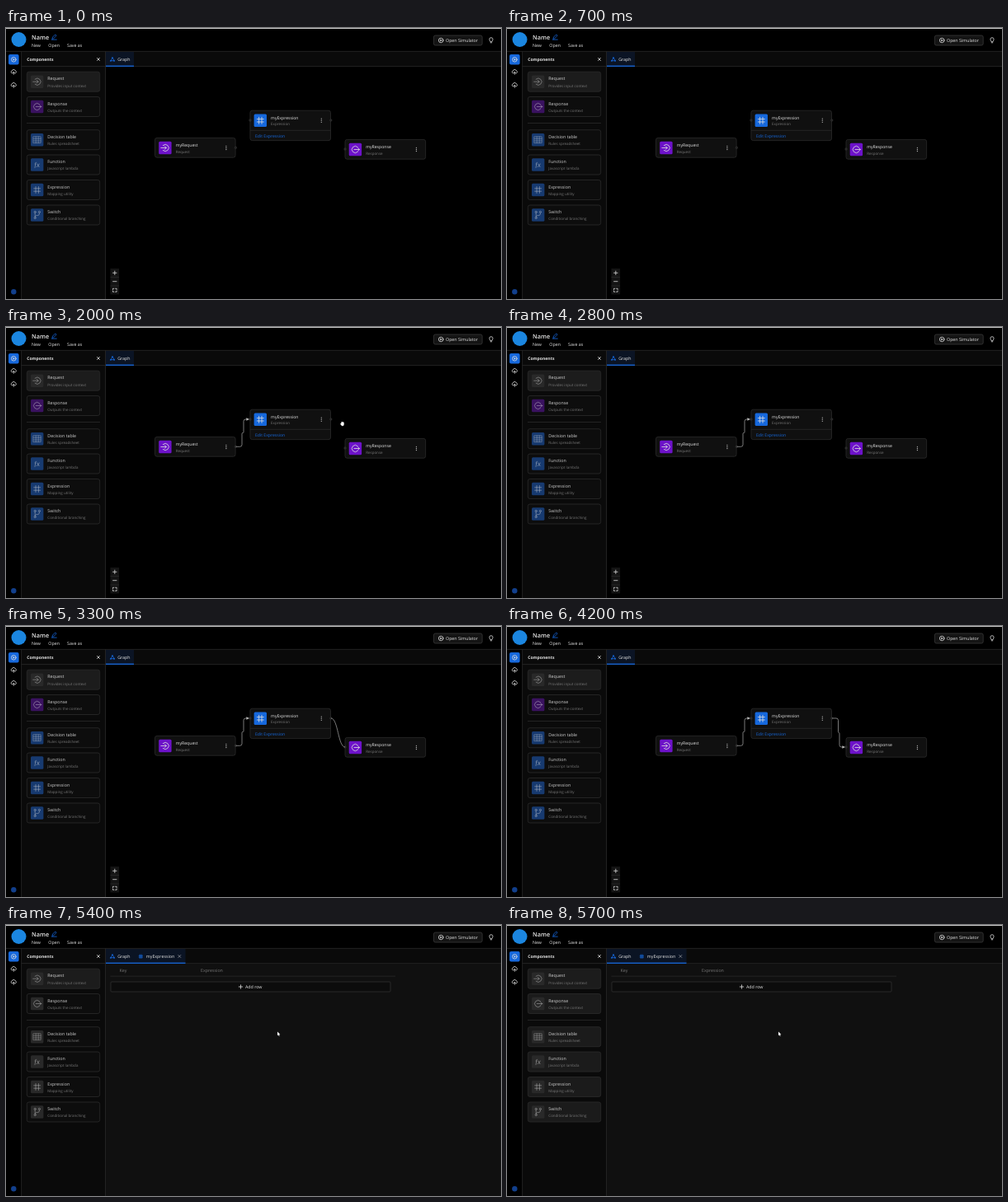
An HTML page that plays this animation: 600x329 px, repeating every 5.8 s.

```html
<!DOCTYPE html>
<html lang="en">
<head>
<meta charset="utf-8">
<title>Graph editor</title>
<style>
html, body { margin: 0; width: 100%; height: 100%; overflow: hidden; background: #000; }
svg { display: block; width: 600px; height: 329px; }
text { font: 5.3px "Open Sans", "Noto Sans", sans-serif; fill: #e4e4e4; text-rendering: geometricPrecision; }
text.sub { font-size: 4.5px; fill: #777; }
.line { fill: none; stroke: #ddd; stroke-width: .8; stroke-linecap: round; stroke-linejoin: round; }
.rule { fill: none; stroke: #2a2a2a; stroke-width: .8; }
.edge { fill: none; stroke: #999; stroke-width: .8; }
</style>
</head>
<body>
<svg id="stage" viewBox="0 0 600 329"></svg>
<script>
const LOOP = 5800, BLUE = '#1668dc', PURPLE = '#6d12c9';
const OPEN_EDITOR = 5400;

const rect = (x, y, w, h, fill, more = '') => `<rect x="${x}" y="${y}" width="${w}" height="${h}" fill="${fill}" ${more}/>`;
const text = (x, y, s, more = '') => `<text x="${x}" y="${y}" ${more}>${s}</text>`;
const line = (d, more = '') => `<path class="line" d="${d}" ${more}/>`;
const rule = d => `<path class="rule" d="${d}"/>`;
const at = (x, y, s, more = '') => `<g transform="translate(${x} ${y})" ${more}>${s}</g>`;
const group = (id, s) => `<g id="${id}">${s}</g>`;

const BORDER = 'stroke="#2b2b2b" stroke-width=".8" rx="2.5"';
const HASH = 'M-1.7-4V4M1.7-4V4M-4-1.7H4M-4 1.7H4';

// Glyphs are centred on the origin.
const glyphs = {
  request: line('M-2.6-3A4.1 4.1 0 1 1-2.6 3M-5 0H1.4M-.5-1.9 1.4 0-.5 1.9'),
  response: line('M2.8-3A4.1 4.1 0 1 0 2.8 3M-1.4 0H5M3.1-1.9 5 0 3.1 1.9'),
  table: line('M-4.5-3.8H4.5V3.8H-4.5ZM-4.5-1.3H4.5M-4.5 1.3H4.5M-1.5-3.8V3.8M1.5-3.8V3.8', 'style="stroke-width:.6"'),
  fx: text(0, 2.6, 'fx', 'text-anchor="middle" style="font:italic 8.5px Lato,sans-serif"'),
  hash: line(HASH),
  branch: line('M-2.5-2.6V2.6M2.7-2.6V-1.5Q2.7 .6 .5 .6H-.5Q-2.5 .6-2.5 2.6') +
    [[-2.5, -3.6], [2.7, -3.6], [-2.5, 3.6]].map(([x, y]) => `<circle class="line" cx="${x}" cy="${y}" r="1.1"/>`).join('')
};
const play = '<circle class="line" r="2.8"/><path d="M-.8-1.4 1.5 0-.8 1.4Z" fill="#ddd"/>';
const cloud = line('M-1.5 1.3H-2A1.5 1.5 0 0 1-2-1.6 2.1 2.1 0 0 1 2-1.6 1.5 1.5 0 0 1 2 1.3H1.5M0 2.8V0M-1 1 0 0 1 1');
const closeMark = line('M-1.5-1.5 1.5 1.5M1.5-1.5-1.5 1.5');

const cards = [
  [65.2, 'Request', 'Provides input context', 'request', '#292929'],
  [95.5, 'Response', 'Outputs the context', 'response', '#3a1260'],
  [135.7, 'Decision table', 'Rules spreadsheet', 'table', '#173a70'],
  [166, 'Function', 'Javascript lambda', 'fx', '#173a70'],
  [196.5, 'Expression', 'Mapping utility', 'hash', '#173a70'],
  [227, 'Switch', 'Conditional branching', 'branch', '#173a70']
];
const card = ([y, name, note, glyph]) =>
  rect(25.3, y - 12, 88.4, 24, '#0d0d0d', `class="card" ${BORDER}`) +
  rect(30, y - 7.7, 15.4, 15.4, '#292929', 'class="badge" rx="1.5"') +
  at(37.7, y, glyphs[glyph], 'opacity=".5"') +
  text(50.3, y - 1.8, name, 'fill-opacity=".9"') + text(50.3, y + 6.3, note, 'class="sub"');

const node = (x, y, h, name, kind, glyph, color) =>
  rect(x, y, 97.6, h, '#101010', BORDER) +
  rect(x + 4.7, y + 4.4, 15.4, 15.4, color, 'rx="1.5"') + at(x + 12.4, y + 12.1, glyphs[glyph]) +
  text(x + 25.2, y + 10.3, name, 'style="font-size:5.15px"') + text(x + 25.2, y + 18.2, kind, 'class="sub"') +
  [-2.1, 0, 2.1].map(d => `<circle cx="${x + 86.4}" cy="${y + 12 + d}" r=".65" fill="#bbb"/>`).join('');
const port = (x, y) => `<circle cx="${x}" cy="${y}" r="1.2" fill="#1b1b1b" stroke="#444" stroke-width=".5"/>`;
const joined = (id, d, x, y) => group(id, `<path class="edge" d="${d}"/><path d="M${x} ${y}l-3.6-1.8v3.6z" fill="#bbb"/>`);

const header =
  rect(0, 0, 600, 1, '#c8c8c8') + rule('M0 28.4H600M18.6 28.4V329M120.5 28.4V329M18.6 46.6H600') +
  '<circle cx="15.5" cy="14" r="9" fill="#1b86e0"/>' +
  text(31, 13.6, 'Name', 'style="font-size:7.3px;font-weight:600"') +
  at(58.3, 10.8, line('M-2.3 2.2-1.8.3 1.4-2.9 2.8-1.5-.4 1.7ZM-3 3.3H3', `style="stroke:${BLUE}"`)) +
  text(31, 22.5, 'New') + text(51.3, 22.5, 'Open') + text(74, 22.5, 'Save as') +
  rect(518.4, 9, 58.8, 12, '#141414', 'stroke="#383838" stroke-width=".8" rx="2"') + at(527.2, 15, play) +
  text(533, 16.9, 'Open Simulator') +
  at(588, 15, line('M-1 1.3C-1 .6-2.1 0-2.1-1.2A2.1 2.1 0 0 1 2.1-1.2C2.1 0 1 .6 1 1.3ZM-.8 2.8H.8')) +
  rect(3, 32, 12.6, 12.6, BLUE, 'rx="2"') + at(9.3, 38.3, play) + at(9.3, 53.5, cloud) + at(9.3, 69.5, cloud) +
  '<circle cx="9.3" cy="320.3" r="3.2" fill="#123f8c"/>';

const panel = text(25.2, 39.8, 'Components', 'style="font-size:5.1px;font-weight:700"') +
  at(112, 38, closeMark) + cards.map(card).join('') + rule('M25 115.5H114');

const tabs = rect(121, 29, 34, 17.2, '#0b1424') +
  at(129, 38.2, line('M0-1.8-1.9 1.5H1.9Z', `style="stroke:${BLUE}"`) +
    [[0, -2], [-2.1, 1.6], [2.1, 1.6]].map(([x, y]) => `<circle cx="${x}" cy="${y}" r=".9" fill="${BLUE}"/>`).join('')) +
  text(135.2, 40, 'Graph') + rect(121, 45.6, 34, 1.3, BLUE);

const graph = rect(121, 47, 479, 282, '#000') +
  node(180.5, 133.4, 23.8, 'myRequest', 'Request', 'request', PURPLE) +
  node(295.9, 100.2, 36.4, 'myExpression', 'Expression', 'hash', BLUE) +
  rule('M296 124.3H393.5') + text(302, 133, 'Edit Expression', 'id="edit" style="font-size:5.1px"') +
  node(411, 135.4, 23.8, 'myResponse', 'Response', 'response', PURPLE) +
  port(278.4, 145.3) + port(295.9, 112) + port(393.8, 112) + port(411, 147) +
  '<path id="drag" class="edge"/>' +
  joined('edge1', 'M278.5 145.3H283.5Q286 145.3 286 142.8V129.5Q286 128.5 287 128.5T288 127.5V114.5Q288 112 290.5 112H293', 295, 112) +
  joined('edge2', 'M394 112H399Q401.5 112 401.5 114.5V128.5Q401.5 129.5 402.2 129.5T403 130.5V144.5Q403 147 405.5 147H408', 410, 147) +
  rect(126.5, 292, 10.6, 31.4, '#141414') + rule('M126.5 302.5H137M126.5 313H137') +
  at(131.8, 297.3, line('M-2.2 0H2.2M0-2.2V2.2')) + at(131.8, 307.7, line('M-2.2 0H2.2')) +
  at(131.8, 318.3, line('M-2.3-.8V-2H-.9M.9-2H2.3V-.8M2.3 .8V2H.9M-.9 2H-2.3V.8'));

const editor = rect(121, 47, 479, 282, '#101010') +
  rect(155, 29, 62.5, 17.2, '#0b1424') + rect(155, 45.6, 62.5, 1.3, BLUE) +
  at(163.3, 38.2, line(HASH, `transform="scale(.55)" style="stroke:${BLUE};stroke-width:1.4"`)) +
  text(169.8, 40, 'myExpression') + at(210.3, 38, closeMark, 'opacity=".6"') +
  text(137.6, 56.6, 'Key', 'style="fill:#777"') + text(236, 56.6, 'Expression', 'style="fill:#777"') +
  rule('M126.5 62.2H472') + rect(127, 69, 339, 12, '#0c0c0c', 'stroke="#303030" stroke-width=".8" rx="1"') +
  at(284.5, 75, line('M-2.2 0H2.2M0-2.2V2.2')) + text(290, 76.9, 'Add row');

const hand = '<path d="M-2-.3-1.2-1V-2.2Q-.9-2.9-.4-2.2 0-3 .5-2.2 1-2.7 1.4-1.9 2.3-2 2.3-1V.8Q2.2 2.7.5 2.8-.8 2.8-1.5 1.5L-2.5 0Z" fill="#fff" stroke="#333" stroke-width=".3"/>';
const arrow = '<path d="M-1-2.6V2.2L.1 1.2.9 2.9 1.7 2.5 1 .9H2.4Z" fill="#fff"/>';

const stage = document.getElementById('stage');
stage.innerHTML = `<defs><linearGradient id="glow" gradientUnits="userSpaceOnUse" x1="0" y1="145" x2="0" y2="118">
  <stop stop-color="#3553e8"/><stop offset="1" stop-color="#999"/></linearGradient></defs>` +
  rect(0, 0, 600, 329, '#000') + rect(19, 28.5, 101.5, 300.5, '#0a0a0a') + rect(121, 28.5, 479, 18, '#0a0a0a') +
  group('graph', graph) + header + panel + tabs + group('editor', editor) +
  group('hand', hand) + group('arrow', arrow);

const $ = id => document.getElementById(id);
const show = (id, on) => $(id).setAttribute('visibility', on ? 'visible' : 'hidden');
const place = (id, [x, y]) => $(id).setAttribute('transform', `translate(${x} ${y})`);
const progress = (t, from, to) => Math.max(0, Math.min(1, (t - from) / (to - from)));
const ease = u => u * u * (3 - 2 * u);
const between = (a, b, u) => a.map((v, i) => v + (b[i] - v) * u);

const drags = [
  { from: 700, snap: 1100, end: 1300, a: [278.5, 145.3], b: [295.5, 112], stroke: 'url(#glow)' },
  { from: 3000, snap: 3300, end: 3700, a: [394, 112], b: [411, 147], stroke: '#999' }
];
const moves = [
  { from: 1800, to: 2000, end: 2500, a: [396, 112], b: [407.5, 117.5] },
  { from: 2500, to: 2700, end: 2700, a: [407.5, 117.5], b: [396, 112] },
  { from: 4700, to: 5000, end: OPEN_EDITOR, a: [421, 147], b: [331.5, 132.5] }
];
const active = (list, t) => list.find(m => t >= m.from && t < m.end);

function render(t) {
  const editing = t >= OPEN_EDITOR;
  show('graph', !editing);
  show('editor', editing);
  show('edge1', !editing && t >= drags[0].end);
  show('edge2', !editing && t >= drags[1].end);

  const drag = active(drags, t);
  show('drag', drag);
  if (drag) {
    const { a, b, from, snap, stroke } = drag;
    const [x, y] = between(a, b, ease(progress(t, from, snap)));
    const mid = (a[0] + x) / 2;
    $('drag').setAttribute('d', `M${a}C${mid} ${a[1]} ${mid} ${y} ${x} ${y}`);
    $('drag').style.stroke = stroke;
  }

  const move = active(moves, t);
  show('hand', move);
  if (move) place('hand', between(move.a, move.b, ease(progress(t, move.from, move.to))));
  show('arrow', editing);
  place('arrow', [330, 132]);
  $('edit').style.fill = t >= 4900 ? '#15325f' : BLUE;

  // Unavailable cards fade to a lighter fill.
  const fade = Math.round(13 + 14 * progress(t, OPEN_EDITOR, 5600));
  stage.querySelectorAll('.card').forEach((c, i) => c.setAttribute('fill', i ? `rgb(${fade},${fade},${fade})` : '#1c1c1c'));
  stage.querySelectorAll('.badge').forEach((b, i) => b.setAttribute('fill', editing ? '#292929' : cards[i][4]));
}

const start = performance.now();
function tick() {
  const t = (performance.now() - start) % LOOP;
  render(Math.floor(t / 100) * 100);
  requestAnimationFrame(tick);
}
tick();
</script>
</body>
</html>
```
